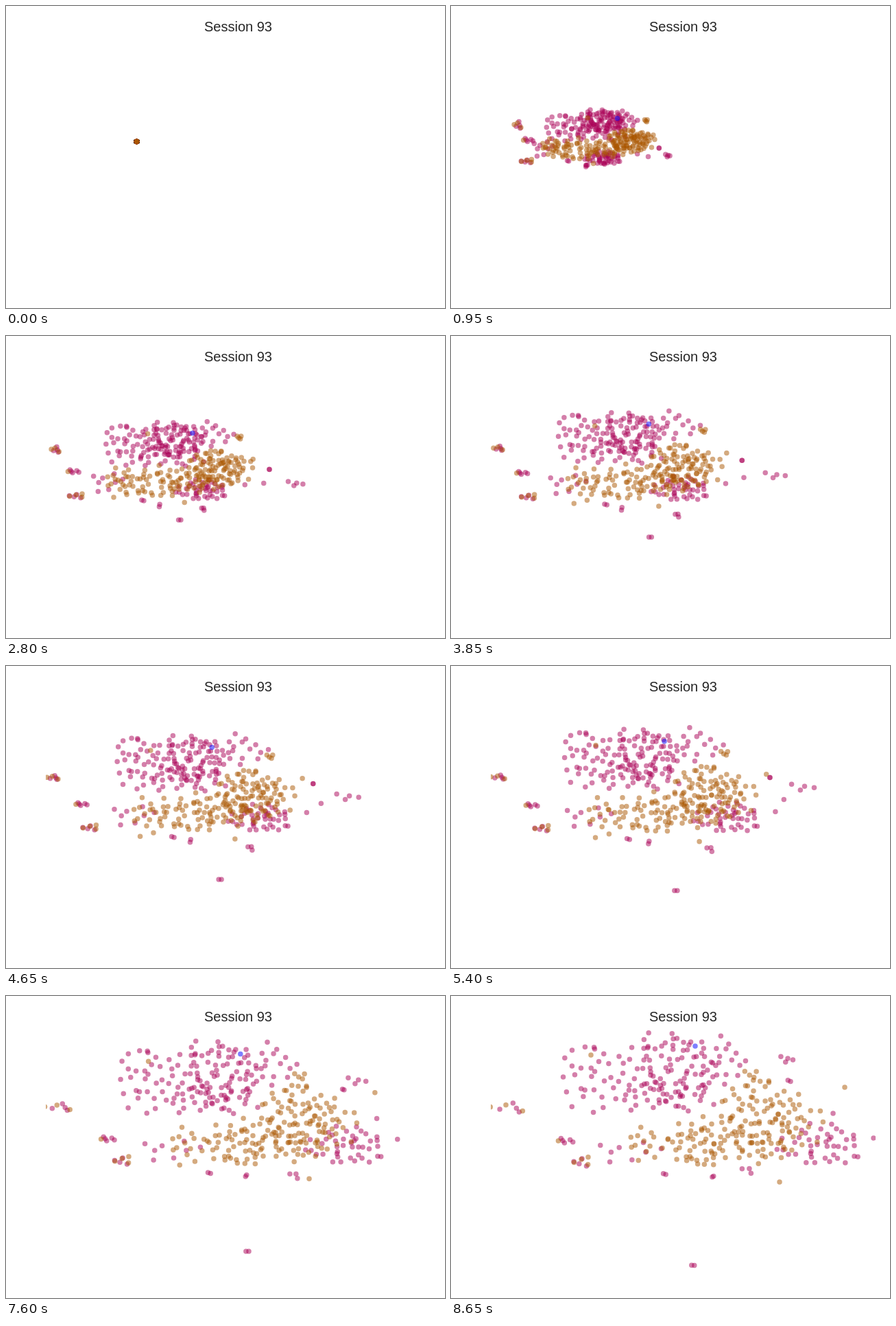
These frames come from a looping animation (640 by 440 pixels, 8.7 s). An HTML page with a canvas:

```html
<!DOCTYPE html>
<html lang="en">
<head>
<meta charset="utf-8">
<title>Session scatter</title>
<style>
  html, body { margin: 0; width: 100%; height: 100%; overflow: hidden; background: #fff; }
  canvas { position: absolute; left: 0; top: 0; }
  h1 {
    position: absolute; left: 58px; top: 19px; width: 561px; margin: 0;
    font: 20px "Liberation Sans", Arial, sans-serif; color: #262626; text-align: center;
  }
</style>
</head>
<body>
<canvas id="stage" width="640" height="440"></canvas>
<h1>Session 93</h1>
<script>
const LOOP = 8700, STEP = 50, BURST_END = 1750, LAST = LOOP - STEP;
const RADIUS = 3.75;
const BLUE = '#0000ff', MAGENTA = '#aa0055', ORANGE = '#aa5500';
const GOLDEN_ANGLE = Math.PI * (3 - Math.sqrt(5));

const ctx = document.getElementById('stage').getContext('2d');
ctx.beginPath();
ctx.rect(58, 43, 561, 354);
ctx.clip();

let seed = 93;
function random() {
  seed = (seed * 16807) % 2147483647;
  return seed / 2147483647;
}

const pose = (x, y, w = 0, h = w) => ({ x, y, w, h });
const ORIGIN = pose(190.5, 197.5);

// Jittered sunflower pattern: an even but irregular fill of the unit disk.
function scatter(count) {
  const turn = random() * 2 * Math.PI;
  const jitter = () => (random() - 0.5) * 0.3;
  return Array.from({ length: count }, (_, i) => {
    const r = Math.sqrt((i + 0.5) / count), angle = turn + i * GOLDEN_ANGLE;
    return [r * Math.cos(angle) + jitter(), r * Math.sin(angle) + jitter()];
  });
}

const mix = (a, b, f) => a + (b - a) * f;
function blend(a, b, f) {
  return pose(mix(a.x, b.x, f), mix(a.y, b.y, f), mix(a.w, b.w, f), mix(a.h, b.h, f));
}

// A cloud drifts and grows between two poses; "via" bends its path at the middle.
const clouds = [];
function cloud(color, count, from, to, via = blend(from, to, 0.5)) {
  clouds.push({ color, points: scatter(count), from, to, via });
}

// Upper field
cloud(MAGENTA, 78, pose(225, 160, 38, 20), pose(320, 104, 62, 56));
cloud(MAGENTA, 31, pose(160, 172, 35, 25), pose(206, 117, 48, 54), pose(192, 136, 32, 43));
cloud(MAGENTA, 29, pose(220, 181, 50, 16), pose(310, 144, 78, 28));
cloud(MAGENTA, 19, pose(263, 161, 25, 17), pose(395, 96, 34, 38), pose(342, 120, 46, 25));
cloud(BLUE, 1, pose(253, 157), pose(356, 73));

// Lower right field and the stragglers beyond it
cloud(MAGENTA, 42, pose(230, 226, 32, 12), pose(541, 217, 62, 33));
cloud(MAGENTA, 4, pose(340, 222, 6, 3), pose(487, 92, 14, 6), pose(500, 185, 26, 6));
cloud(MAGENTA, 2, pose(326, 209), pose(494, 123, 3), pose(455, 168));
cloud(MAGENTA, 1, pose(307, 224), pose(557, 171), pose(470, 198));
cloud(MAGENTA, 1, pose(288, 219), pose(616, 207));

// Pairs below
cloud(MAGENTA, 2, pose(199, 239, 2), pose(352, 393, 3), pose(318, 318, 3));
cloud(MAGENTA, 3, pose(230, 236, 2), pose(434, 254, 12, 8), pose(366, 266, 6));
cloud(MAGENTA, 2, pose(167, 231, 2), pose(312, 259, 3), pose(250, 250, 3));
cloud(MAGENTA, 2, pose(198, 240, 2), pose(381, 263, 6, 1), pose(276, 255, 3));

// Left islands of mixed colour
cloud(MAGENTA, 8, pose(122, 208, 20, 18), pose(258, 225, 55, 20));
function island(magentas, oranges, ...poses) {
  cloud(MAGENTA, magentas, ...poses);
  cloud(ORANGE, oranges, ...poses);
}
island(4, 3, pose(79, 168, 8), pose(84, 162, 32, 9), pose(69, 162, 12, 4));
island(5, 1, pose(96, 195, 10, 4), pose(166, 211, 13, 5), pose(112, 202, 10, 3));
island(4, 4, pose(95, 232, 13, 4), pose(191, 242, 15, 9), pose(127, 236, 14, 5));

// Orange band with its outliers
cloud(ORANGE, 14, pose(142, 206, 28, 15), pose(286, 215, 34, 27), pose(212, 220, 28, 32));
cloud(ORANGE, 42, pose(174, 212, 46, 20), pose(358, 216, 40, 38), pose(272, 216, 52, 30));
cloud(ORANGE, 32, pose(235, 211, 35, 14), pose(430, 212, 65, 35));
cloud(ORANGE, 18, pose(295, 195, 25, 18), pose(505, 186, 40, 38));
cloud(ORANGE, 1, pose(201, 156), pose(204, 86), pose(211, 120));
cloud(ORANGE, 1, pose(312, 190), pose(574, 133));
cloud(ORANGE, 1, pose(211, 236), pose(479, 271));
cloud(ORANGE, 4, pose(304, 161, 4, 3), pose(440, 114, 15, 7), pose(392, 130, 8, 4));
cloud(ORANGE, 76, pose(272, 195, 34, 20), pose(450, 174, 56, 58));

// Parabola through the three poses.
function drift({ from, via, to }, f) {
  const a = (1 - f) * (1 - 2 * f), b = 4 * f * (1 - f), c = f * (2 * f - 1);
  const sum = key => a * from[key] + b * via[key] + c * to[key];
  return pose(sum('x'), sum('y'), sum('w'), sum('h'));
}

function poseAt(path, time) {
  if (time < BURST_END) return blend(ORIGIN, path.from, (time / BURST_END) ** 0.3);
  return drift(path, ((time - BURST_END) / (LAST - BURST_END)) ** 0.9);
}

function draw(now) {
  const tick = Math.floor((now % LOOP) / STEP) * STEP;
  const time = tick < 2 * STEP ? 0 : tick;
  ctx.globalAlpha = 1;
  ctx.fillStyle = '#fff';
  ctx.fillRect(0, 0, 640, 440);
  ctx.globalAlpha = 0.5;
  for (const path of clouds) {
    const { x, y, w, h } = poseAt(path, time);
    ctx.fillStyle = path.color;
    for (const [u, v] of path.points) {
      ctx.beginPath();
      ctx.arc(x + u * w, y + v * h, RADIUS, 0, 2 * Math.PI);
      ctx.fill();
    }
  }
}

const start = performance.now();
function loop() {
  draw(performance.now() - start);
  requestAnimationFrame(loop);
}
loop();
</script>
</body>
</html>
```
